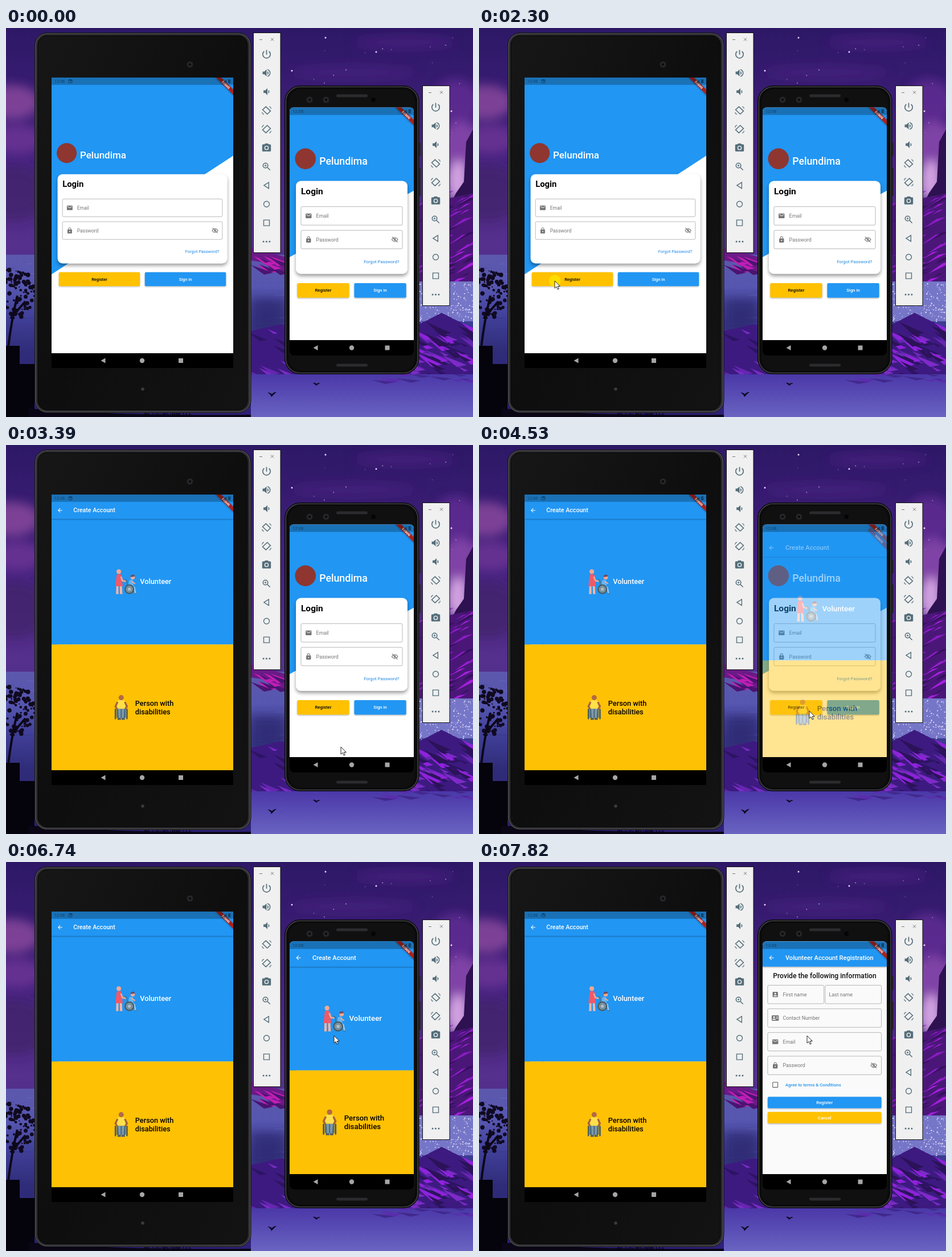
Animation of 820 by 683 pixels, one loop 8000 ms. Source, as an HTML page:

```html
<!DOCTYPE html>
<html lang="en">
<head>
<meta charset="utf-8">
<title>Account registration demo</title>
<style>
html, body { margin: 0; width: 100%; height: 100%; overflow: hidden; background: #2a1560; }
svg { display: block; width: 100vw; height: 100vh; }
text { font-family: Roboto, sans-serif; }
</style>
</head>
<body>
<svg id="stage" viewBox="0 0 820 683" preserveAspectRatio="none"></svg>
<script>
const LOOP = 8000, BLUE = '#2196f3', AMBER = '#ffc103', LOGO = '#8f3630';

// ---------- markup helpers ----------
const rect = (x, y, w, h, fill, more = '') =>
  `<rect x="${x}" y="${y}" width="${w}" height="${h}" fill="${fill}" ${more}/>`;
const circle = (x, y, r, fill, more = '') =>
  `<circle cx="${x}" cy="${y}" r="${r}" fill="${fill}" ${more}/>`;
const path = (d, fill, more = '') => `<path d="${d}" fill="${fill}" ${more}/>`;
const line = (d, color, width, more = '') =>
  path(d, 'none', `stroke="${color}" stroke-width="${width}" ${more}`);
const text = (x, y, s, size, fill, more = '') =>
  `<text x="${x}" y="${y}" font-size="${size}" fill="${fill}" ${more}>${s}</text>`;
const group = (more, ...parts) => `<g ${more}>${parts.join('')}</g>`;
const MED = 'font-weight="500"', MID = 'text-anchor="middle"';

let seed = 7;
const rnd = (a = 0, b = 1) => {
  seed = (seed * 16807) % 2147483647;
  return +(a + (b - a) * seed / 2147483647).toFixed(1);
};
const many = (n, f) => Array.from({ length: n }, (_, i) => f(i)).join('');

// ---------- icons on a 24 unit grid ----------
const stroke = (d, w = 2) => `<path d="${d}" fill="none" stroke="currentColor" stroke-width="${w}"/>`;
const solid = d => `<path d="${d}" fill="currentColor" fill-rule="evenodd"/>`;
const turn = stroke('M10.500 3.500L21 13.500L13.500 20.500L3 10.500Z', 2) +
  stroke('M18 3Q21.500 4 22.500 8M6 21Q2.500 20 1.500 16', 1.5);
const icons = {
  mail: solid('M20 4H4c-1.1 0-2 .9-2 2v12c0 1.1.9 2 2 2h16c1.1 0 2-.9 2-2V6c0-1.1-.9-2-2-2zm0 4l-8 5-8-5V6l8 5 8-5z'),
  lock: solid('M18 8h-1V6a5 5 0 0 0-10 0v2H6a2 2 0 0 0-2 2v10a2 2 0 0 0 2 2h12a2 2 0 0 0 2-2V10a2 2 0 0 0-2-2zM12 17a2 2 0 1 1 0-4 2 2 0 0 1 0 4zM15.100 8H8.900V6a3.100 3.100 0 0 1 6.200 0z'),
  eyeOff: stroke('M2 12Q6 5.500 12 5.500T22 12Q18 18.500 12 18.500T2 12ZM3 3L21 21') + stroke('M9 12a3 3 0 1 0 6 0a3 3 0 1 0-6 0'),
  person: solid('M5 3H19a2 2 0 0 1 2 2V19a2 2 0 0 1-2 2H5a2 2 0 0 1-2-2V5a2 2 0 0 1 2-2ZM12 6a3 3 0 1 0 0 6a3 3 0 0 0 0-6ZM6 18H18V17Q17 14 12 14T6 17Z'),
  contact: solid('M2 3H22a2 2 0 0 1 2 2V19a2 2 0 0 1-2 2H2a2 2 0 0 1-2-2V5a2 2 0 0 1 2-2ZM8 6a3 3 0 1 0 0 6a3 3 0 0 0 0-6ZM2 18H14V17Q13 14 8 14T2 17ZM15 7H22V9H15ZM15 12H22V14H15Z'),
  back: solid('M20 11H7.830l5.590-5.590L12 4l-8 8 8 8 1.410-1.410L7.830 13H20z'),
  power: stroke('M12 3V13M7 6A8 8 0 1 0 17 6'),
  loud: solid('M3 9v6h4l5 5V4L7 9zM14 8Q16.500 9 16.500 12T14 16Z') + stroke('M14 4.300Q20 6 20 12T14 19.700'),
  quiet: solid('M5 9v6h4l5 5V4L9 9zM16 8Q18.500 9 18.500 12T16 16Z'),
  left: turn,
  right: `<g transform="translate(24) scale(-1 1)">${turn}</g>`,
  camera: solid('M9 2L7.200 4H4a2 2 0 0 0-2 2v12a2 2 0 0 0 2 2h16a2 2 0 0 0 2-2V6a2 2 0 0 0-2-2h-3.200L15 2zM12 17a5 5 0 1 1 0-10 5 5 0 0 1 0 10z') + circle(12, 12, 3.2, 'currentColor'),
  zoom: stroke('M4 9.500a5.500 5.500 0 1 0 11 0a5.500 5.500 0 1 0-11 0M13.500 13.500L20 20') + stroke('M7 9.500H12M9.500 7V12', 1.4),
  navBack: stroke('M17 5V19L6 12Z', 1.8),
  home: stroke('M5.500 12a6.500 6.500 0 1 0 13 0a6.500 6.500 0 1 0-13 0', 1.8),
  recent: stroke('M5.500 5.500H18.500V18.500H5.500Z', 1.8),
  more: [5, 12, 19].map(x => circle(x, 12, 2, 'currentColor')).join('')
};
const icon = (name, cx, cy, size, color) =>
  group(`color="${color}" transform="translate(${cx - size / 2} ${cy - size / 2}) scale(${size / 24})"`, icons[name]);

// ---------- wallpaper ----------
const streaks = (n, x0, x1, y0, y1, slope, colors) => many(n, i => {
  const x = rnd(x0, x1), y = rnd(y0, y1), l = rnd(12, 46);
  return path(`M${x} ${y}l${l} ${l * slope}l${-l * .4} ${l * .08}z`, colors[i % colors.length]);
});
const blob = (x, y, rx, ry, c, o) =>
  `<ellipse cx="${x}" cy="${y}" rx="${rx}" ry="${ry}" fill="${c}" opacity="${o}"/>`;
const wallpaper = () => [
  rect(0, 0, 820, 683, 'url(#sky)'),
  group('filter="url(#soft)"',
    blob(10, 130, 50, 30, '#a055a8', .65), blob(20, 195, 46, 26, '#74389a', .7), blob(15, 290, 60, 50, '#3f2168', .7),
    blob(610, 78, 110, 12, '#5a2890', .35), blob(700, 25, 90, 12, '#5f2a94', .4), blob(790, 130, 42, 40, '#7131a0', .6),
    blob(800, 205, 40, 40, '#a055bd', .65), blob(793, 268, 20, 36, '#e0b0ea', .9)),
  many(34, () => circle(rnd(430, 820), rnd(4, 240), rnd(.4, 1.1), '#d9b8f0', 'opacity=".7"')),
  [[502, 75], [782, 146], [561, 17], [650, 42]].map(p => circle(...p, 1.5, '#f0d8ff')).join(''),
  rect(0, 398, 820, 285, 'url(#water)'),
  many(60, i => rect(rnd(-20, 500), rnd(402, 540), rnd(12, 50), 1, i % 2 ? '#7678cc' : '#37348a', 'opacity=".45"')),
  path('M820 178L808 200L804 270L790 290L776 318L726 330V405L820 400Z', '#2d1150'),
  path('M430 385L490 402V432L455 412L430 408Z', '#6a1a86'),
  streaks(10, 425, 470, 395, 418, .35, ['#c01eb4', '#4a1470']),
  path('M726 310L820 290V460L726 470Z', '#4a1778'),
  streaks(54, 715, 805, 300, 462, -.5, ['#a51fdc', '#35105c', '#8a1cc4']),
  rect(726, 445, 94, 70, '#7676c8'),
  many(190, () => circle(rnd(726, 820), rnd(447, 518), rnd(.4, 1.3), '#f0eaff', 'opacity=".85"')),
  rect(430, 475, 60, 65, '#2e2a72', 'filter="url(#soft)" opacity=".85"'),
  path('M726 520L765 500L820 528V615L726 625L580 630L430 605V532L482 520L560 540Z', '#3d1a80'),
  streaks(80, 420, 812, 525, 605, .4, ['#7a2cc4', '#2c1462', '#6526b0']),
  streaks(26, 715, 810, 515, 590, .45, ['#8f22dc', '#2c1258']),
  rect(430, 608, 390, 75, 'url(#shore)'),
  streaks(12, 640, 800, 602, 618, .1, ['#5a2cac', '#41288c']),
  many(170, () => {
    const a = rnd(0, 6.28), r = 46 * Math.sqrt(rnd());
    return circle((6 + r * Math.cos(a)).toFixed(1), (466 + r * Math.sin(a)).toFixed(1), rnd(1, 4), '#100a20');
  }),
  line('M4 560Q10 510 20 470M8 510L34 480', '#0c0818', 4),
  path('M0 558H24V590H50V683H0Z', '#05030c'),
  path('M40 683V668Q150 676 240 678T430 679V683Z', '#0a0616'),
  many(40, () => { const x = rnd(235, 325); return line(`M${x} 683l${rnd(-4, 4)} ${rnd(-9, -4)}`, '#0a0616', 1.2); }),
  path('M340 683q12-5 22 0zM365 683q18-6 40 0z', '#0a0616'),
  path('M459 640Q464 640 467 643Q470 639 475 639Q470 643 466 648Q465 643 459 640ZM539 623Q543 622 545 625Q548 622 552 624Q547 625 545 628Z', '#0c0820')
].join('');

// ---------- emulator shells ----------
const navBar = (x, y, w, h, xs, cy) => rect(x, y, w, h, '#000') + group('fill="#a6a6a6"',
  `<path d="M${xs[0] - 4.5} ${cy}l8-4.500v9z"/><circle cx="${xs[1]}" cy="${cy}" r="4.200"/><rect x="${xs[2] - 4}" y="${cy - 4}" width="8" height="8"/>`);
const lens = (x, y, r) => circle(x, y, r, '#242426') + circle(x, y, r * .55, '#0b0b10', 'stroke="#39393d" stroke-width=".8"');
const shells = () => [
  rect(50.5, 8.500, 379.5, 667, '#2b2b2e', 'rx="22" stroke="#131315"'),
  rect(52, 10, 376.5, 664, 'none', 'rx="20" stroke="#555559" stroke-width="1.200"'),
  rect(56, 13.500, 368, 657, 'url(#body)', 'rx="16" stroke="#050505"'),
  lens(323, 64, 5.500), circle(240, 634, 2.800, '#3b3b3e'),
  navBar(80, 571, 319, 26, [171, 239, 307], 584),
  rect(725, 201, 3, 24, '#29292b', 'rx="1"'), rect(725, 245, 3, 50, '#29292b', 'rx="1"'),
  rect(489.500, 101.500, 235.5, 506, '#1c1c1f', 'rx="27" stroke="#0a0a0a"'),
  rect(491.500, 103.500, 231.5, 502, '#0b0b0c', 'rx="25" stroke="#4a4a4e" stroke-width="1.200"'),
  rect(496, 107, 222, 495, '#101011', 'rx="22"'),
  rect(580, 116.500, 55, 5, '#2b2b2e', 'rx="2.500"'), rect(580, 589.500, 55, 5, '#2b2b2e', 'rx="2.500"'),
  lens(533, 126, 5.500), lens(562, 126, 5.500), circle(645, 126, 4, '#050507'),
  path('M498 548H716V566Q716 575 707 575H507Q498 575 498 566Z', '#000'),
  navBar(505, 548, 204, 26, [544, 607, 669.5], 561.5)
].join('');
const tools = ['power', 'loud', 'quiet', 'left', 'right', 'camera', 'zoom', 'navBack', 'home', 'recent', 'more'];
const toolbar = (x, y) => group(`transform="translate(${x} ${y})"`,
  rect(.5, .5, 47.5, 386, '#f0f0f0', 'stroke="#111"'),
  line('M11 12.500h5M31 9.500l5 5m0-5l-5 5', '#777', 1),
  tools.map((n, i) => icon(n, 23.5, 38 + i * 32.9, n === 'power' ? 20 : 18.5, '#546e7a')).join(''));

// ---------- app pages, in dp ----------
const field = (x, y, w, glyph, label, eye) =>
  rect(x, y, w, 58.5, 'none', 'rx="4" stroke="#a2a2a2" stroke-width="1.400"') +
  (glyph ? icon(glyph, x + 24, y + 29.3, 22.5, '#757575') : '') +
  text(x + (glyph ? 48 : 12), y + 35, label, 16, '#757575') +
  (eye ? icon('eyeOff', x + w - 24, y + 29.3, 23, '#757575') : '');
const button = (x, y, w, h, fill, label, color, id) =>
  rect(x, y, w, h, fill, 'rx="4" filter="url(#lift)"') +
  (id ? `<clipPath id="${id}C">${rect(x, y, w, h, '#000', 'rx="4"')}</clipPath>
    <g clip-path="url(#${id}C)">${circle(0, 0, 0, '#fff', `id="${id}"`)}</g>` : '') +
  text(x + w / 2, y + h / 2 + 5, label, 14, color, MED + ' ' + MID);
const banner = W => group(`transform="translate(${W}) rotate(45)"`,
  rect(-45, 28, 90, 12, '#a8231f', 'filter="url(#lift)"'),
  text(0, 37.700, 'DEBUG', 10.2, '#fff', 'font-weight="900" ' + MID));
const appBar = (W, title) => rect(0, 0, W, 80, BLUE, 'filter="url(#lift)"') +
  icon('back', 28, 52, 22, '#fff') + text(72, 59, title, 20, '#fff', MED);

const login = ({ W, H, cardY, slope, id }) => group('',
  rect(0, 0, W, H, '#fff'),
  path(`M0 0H${W}V${slope[1]}L0 ${slope[0]}Z`, BLUE),
  circle(50, cardY - 70, 33, LOGO),
  text(94, cardY - 52, 'Pelundima', 32, '#fff', MED),
  rect(20, cardY, W - 40, 294, '#fff', 'rx="16" filter="url(#card)"'),
  text(36, cardY + 42, 'Login', 28, '#000', 'font-weight="700"'),
  field(36, cardY + 81.5, W - 72, 'mail', 'Email'),
  field(36, cardY + 156.5, W - 72, 'lock', 'Password', true),
  text(W - 46, cardY + 260, 'Forgot Password?', 14, '#1e88e5', 'text-anchor="end"'),
  button(24, cardY + 323.5, W / 2 - 32, 46, AMBER, 'Register', '#000', id + 'Press'),
  button(W / 2 + 8, cardY + 323.5, W / 2 - 32, 46, BLUE, 'Sign in', '#fff'),
  banner(W));

const helperArt = [
  path('M7 50h7v32H6zM18 50h7l2 32h-8z', '#f5b5a5'),
  path('M8 18Q16 14 24 18L28 56H4Z', '#ef5a6a'),
  circle(15, 8, 7.500, '#f3a893'),
  line('M22 24L27 38L38 40', '#f3a893', 5, 'stroke-linejoin="round"'),
  line('M34 33L42 38L44 62H62L68 80H74', '#546e7a', 3),
  path('M49 38Q55 33 62 37L64 58H47Z', '#64b5f6'),
  line('M58 40L69 48', '#f3a893', 4), line('M52 60H66L70 79', '#90caf9', 5),
  circle(61, 27, 7, '#f3a893'), path('M54 26a7 7 0 0 1 14-2z', '#6d4c5c'),
  circle(50, 66, 14, '#78909c', 'stroke="#455a64" stroke-width="4"'), circle(50, 66, 5, '#b0bec5')
].join('');
const chairArt = [
  line('M4 48V78M42 48V78', '#455a64', 5, 'stroke-linecap="round"'),
  rect(8, 42, 30, 34, '#4a6b80', 'rx="3"'),
  path('M11 20Q23 13 35 20L37 46H9Z', '#ffe04a'),
  line('M11 23L4 38L10 47M35 23L42 38L36 47', '#a5623e', 6, 'stroke-linejoin="round"'),
  path('M13 46H21V78H15ZM25 46H33L31 78H25Z', '#7f9aaa'),
  path('M11 76H22V82H11ZM24 76H35V82H24Z', '#4e5d66'),
  circle(23, 9, 8.500, '#b26a45')
].join('');

const create = ({ W, H, id }) => {
  const split = (80 + H) / 2, top = (80 + split) / 2, low = (split + H) / 2;
  return group(`id="${id}Create"`,
    rect(0, 0, W, split, BLUE), rect(0, split, W, H - split, AMBER),
    `<clipPath id="${id}TileC">${rect(0, 80, W, split - 80, '#000')}</clipPath>`,
    group(`clip-path="url(#${id}TileC)"`, circle(0, 0, 0, '#fff', `id="${id}Tile"`)),
    group(`transform="translate(${W / 2 - 93} ${top - 41})"`, helperArt),
    text(W / 2 - 8, top + 8.5, 'Volunteer', 24, '#fff', MED),
    group(`transform="translate(${W / 2 - 93} ${low - 41})"`, chairArt),
    text(W / 2 - 24, low - 5, 'Person with', 24, '#000', MED),
    text(W / 2 - 24, low + 22.5, 'disabilities', 24, '#000', MED),
    appBar(W, 'Create Account'), banner(W));
};

const form = ({ W, H }) => group('id="form"',
  rect(0, 0, W, H, '#fafafa'),
  text(W / 2, 117, 'Provide the following information', 22, '#111', MED + ' ' + MID),
  field(16, 139, 178, 'person', 'First name'), field(198, 139, 178, '', 'Last name'),
  field(16, 213.5, 360, 'contact', 'Contact Number'),
  field(16, 288.5, 360, 'mail', 'Email'),
  field(16, 363.5, 360, 'lock', 'Password', true),
  rect(32, 446, 16, 16, 'none', 'rx="1" stroke="#616161" stroke-width="2"'),
  text(72, 459, 'Agree to terms &amp; Conditions', 14, BLUE, MED),
  button(16, 492, 360, 36, BLUE, 'Register', '#fff'),
  button(16, 540, 360, 36, AMBER, 'Cancel', '#fff'),
  appBar(W, 'Volunteer Account Registration'), banner(W));

const device = (id, x, y, w, h, W, more) => ({ id, x, y, W, s: w / W, H: h * W / w, ...more });
const tablet = device('tab', 80, 87, 319, 484, 600, { cardY: 319.5, slope: [650, 258], r: 0 });
const phone = device('ph', 498, 139.3, 218, 408.7, 393, { cardY: 232.8, slope: [474, 264], r: 14 });
const screen = (d, ...pages) => `<clipPath id="${d.id}C"><path d="M0 ${d.H}V${d.r}Q0 0 ${d.r} 0H${d.W - d.r}Q${d.W} 0 ${d.W} ${d.r}V${d.H}Z"/></clipPath>` +
  group(`transform="translate(${d.x} ${d.y}) scale(${d.s})" clip-path="url(#${d.id}C)"`, ...pages,
    rect(0, 0, d.W, 24, '#000', 'opacity=".25"'),
    group('opacity=".6"', text(9, 17, '12:08', 14, '#0a2740'),
      rect(d.W - 17, 6, 8, 13, '#0a2740', 'rx="1"'), path(`M${d.W - 34} 18h12V6z`, '#0a2740'),
      d === tablet ? circle(62, 12, 6, 'none', 'stroke="#0a2740" stroke-width="2"') + circle(63, 10, 3, '#0a2740') : ''));

const stops = list => list.map(([o, c]) => `<stop offset="${o}" stop-color="${c}"/>`).join('');
const gradient = (id, list, more = 'x2="0" y2="1"') => `<linearGradient id="${id}" ${more}>${stops(list)}</linearGradient>`;
const shadow = (id, dy, blur, o) => `<filter id="${id}" x="-20%" y="-20%" width="140%" height="150%">
  <feDropShadow dx="0" dy="${dy}" stdDeviation="${blur}" flood-opacity="${o}"/></filter>`;

document.getElementById('stage').innerHTML = [
  '<defs>',
  gradient('sky', [[0, '#2d1866'], [.18, '#3a1d74'], [.4, '#4c2584'], [.55, '#55308c'], [1, '#3c2a90']]),
  gradient('water', [[0, '#5c58ac'], [.2, '#5656b0'], [.4, '#3f3e96'], [.6, '#2f2c78'], [1, '#2c2078']]),
  gradient('shore', [[0, '#4b38a8'], [.4, '#5649b2'], [1, '#6a64c2']]),
  gradient('body', [[0, '#171718'], [.5, '#0e0e0f'], [1, '#131314']], 'x2="1" y2="1"'),
  '<filter id="soft" x="-50%" y="-50%" width="200%" height="200%"><feGaussianBlur stdDeviation="9"/></filter>',
  shadow('lift', 2, 1.6, .35), shadow('card', 7, 6, .4),
  '</defs>',
  wallpaper(), shells(), toolbar(434, 8), toolbar(731, 101),
  screen(tablet, login(tablet), create(tablet)),
  screen(phone, login(phone), create(phone), form(phone)),
  circle(0, 0, 10.5, '#ffe600', 'id="halo" opacity=".75"'),
  path('M0 0V13L3 10.300L5.200 15L7.300 14.100L5.200 9.500H9.300Z', '#fff', 'id="cursor" stroke="#111" stroke-width=".9" stroke-linejoin="round"')
].join('');

// ---------- motion ----------
const $ = id => document.getElementById(id);
const clamp = v => Math.min(1, Math.max(0, v));
const span = (t, from, length) => clamp((t - from) / length);
const mix = (a, b, p) => a + (b - a) * p;
const bezier = (x1, y1, x2, y2) => x => {
  const at = (a, b, u) => 3 * a * u * (1 - u) ** 2 + 3 * b * u * u * (1 - u) + u ** 3;
  let lo = 0, hi = 1;
  for (let i = 0; i < 24; i++) {
    const u = (lo + hi) / 2;
    if (at(x1, x2, u) < x) lo = u; else hi = u;
  }
  return at(y1, y2, lo);
};
const ease = bezier(.25, .1, .25, 1), easeIn = bezier(.42, 0, 1, 1), slide = bezier(.4, 0, .2, 1);
const smooth = p => p * p * (3 - 2 * p);

// time, x, y of the pointer tip
const route = [[950, 616, 632], [1740, 133, 444], [3060, 133, 444], [3390, 588, 530], [3480, 606, 526],
  [3850, 581, 470], [3900, 581, 469], [3970, 580, 467], [5400, 580, 467], [5460, 582, 465],
  [5780, 584, 381], [6030, 584, 380], [6470, 584, 380], [6740, 576, 305]];
const clicks = [2300, 4150, 6990];

function pointer(t) {
  const i = route.findIndex(k => k[0] > t);
  if (i < 0) return route[route.length - 1].slice(1);
  const a = route[Math.max(0, i - 1)], b = route[i];
  const p = smooth(span(t, a[0], b[0] - a[0] || 1));
  return [mix(a[1], b[1], p), mix(a[2], b[2], p)];
}

function enter(id, t, start, length, H) {
  const p = span(t, start, length), el = $(id);
  el.setAttribute('visibility', p > 0 ? 'visible' : 'hidden');
  el.setAttribute('opacity', easeIn(p));
  el.setAttribute('transform', `translate(0 ${H / 4 * (1 - slide(p))})`);
}

function ripple(id, t, start, length, from, to, radius, release) {
  const p = ease(span(t, start, length)), el = $(id);
  el.setAttribute('cx', mix(from[0], to[0], p));
  el.setAttribute('cy', mix(from[1], to[1], p));
  el.setAttribute('r', radius * mix(.3, 1, p));
  el.setAttribute('opacity', .22 * span(t, start, 75) * (1 - span(t, release, 300)));
}

const toDp = (d, x, y) => [(x - d.x) / d.s, (y - d.y) / d.s];

function draw(t) {
  const [x, y] = pointer(t), at = `translate(${x} ${y})`;
  $('cursor').setAttribute('transform', at);
  $('cursor').setAttribute('visibility', t < 950 ? 'hidden' : 'visible');
  $('halo').setAttribute('transform', at);
  $('halo').setAttribute('visibility', clicks.some(c => t >= c && t < c + 150) ? 'visible' : 'hidden');

  ripple('tabPress', t, 2320, 225, toDp(tablet, 133, 444), [158, 666], 140, 2450);
  ripple('phPress', t, 4170, 225, toDp(phone, 580, 467), [106, 579], 90, 4350);
  ripple('phTile', t, 7140, 1000, toDp(phone, 576, 305), [196.5, 244], 256, 7600);

  enter('tabCreate', t, 2450, 300, tablet.H);
  enter('phCreate', t, 4350, 300, phone.H);
  enter('form', t, 7570, 250, phone.H);
}

const begin = performance.now();
function tick() {
  draw((performance.now() - begin) % LOOP);
  requestAnimationFrame(tick);
}
tick();
</script>
</body>
</html>
```
